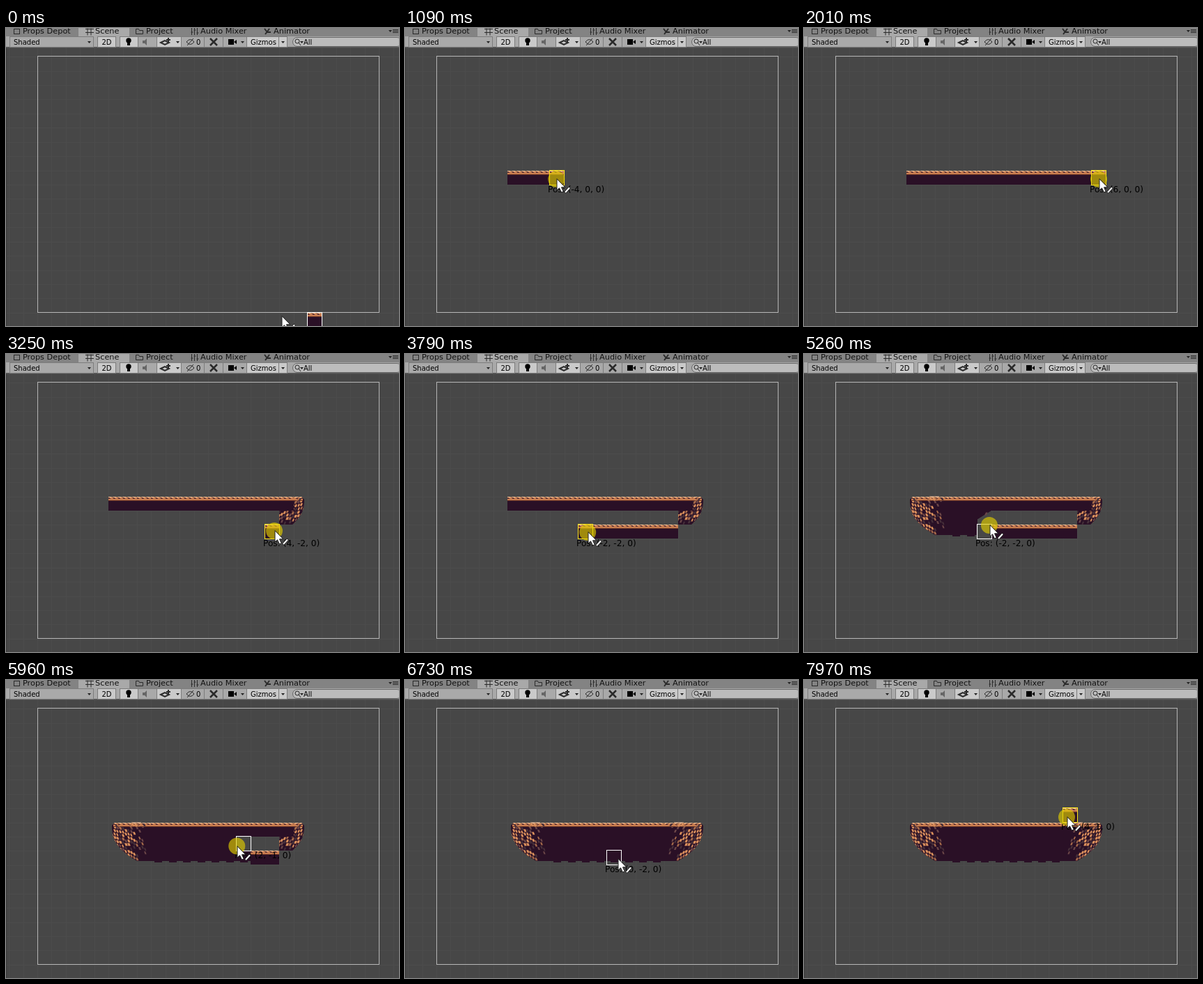
These frames come from a looping animation (564 by 428 pixels, 8 s). An HTML page with a canvas:

```html
<!DOCTYPE html>
<html lang="en">
<head>
<meta charset="utf-8">
<title>Rule tile painting</title>
<style>
html, body { margin: 0; width: 564px; height: 428px; overflow: hidden; background: #474747; }
canvas, svg.bar { position: absolute; left: 0; top: 0; display: block; }
text { font: 11.3px "DejaVu Sans", sans-serif; fill: #111; }
.small text { font-size: 10px; fill: #000; }
.button { fill: #a9a9a9; stroke: #7c7c7c; }
.button.on { fill: #cacaca; }
.icon { fill: none; stroke: #2a2a2a; }
</style>
</head>
<body>
<canvas id="view" width="564" height="428"></canvas>
<svg class="bar" width="564" height="29">
  <defs>
    <path id="caret" d="M0 0h5l-2.500 3z" fill="#222"/>
  </defs>
  <rect width="564" height="12" fill="#838383"/>
  <rect x="104" width="73" height="13" fill="#a9a9a9"/>
  <rect y="12" width="564" height="16" fill="#a9a9a9"/>
  <rect y="27" width="564" height="1.500" fill="#5c5c5c"/>
  <g transform="translate(.5 12.500)">
    <rect class="button" x="5" width="120" height="15"/>
    <rect class="button on" x="131" width="26" height="15"/>
    <rect class="button on" x="163" width="26" height="15"/>
    <rect class="button" x="189" width="27" height="15"/>
    <rect class="button on" x="216" width="35" height="15"/>
    <rect class="button" x="251" width="33" height="15"/>
    <rect class="button" x="284" width="27" height="15"/>
    <rect class="button" x="311" width="34" height="15"/>
    <rect class="button on" x="345" width="46" height="15"/>
    <rect class="button on" x="391" width="12" height="15"/>
    <rect x="411" y="1" width="156" height="13" rx="6.500" fill="#bcbcbc" stroke="#686868"/>
  </g>
  <use href="#caret" x="117" y="19"/>
  <use href="#caret" x="244" y="19"/>
  <use href="#caret" x="337" y="19"/>
  <use href="#caret" x="395" y="19"/>
  <use href="#caret" x="422" y="19"/>
  <use href="#caret" x="549" y="3"/>
  <path class="icon" d="M555 2.500h8m-8 2h8m-8 2h8"/>
  <circle cx="176" cy="18" r="3.700"/><rect x="174" y="21" width="4" height="4"/>
  <path d="M196 18h3l3-3v10l-3-3h-3z" fill="#666"/>
  <path class="icon" d="M222 21l6-3 6 3-6 3zm8-4h6m-3-3v6" stroke-width="2"/>
  <path class="icon" d="M259 20q5.500-7 11 0q-5.500 7-11 0m1 5l9-10"/>
  <path class="icon" d="M293 15l10 10m0-10l-10 10" stroke-width="2.500"/>
  <path d="M319 16h8v8h-8zm8 4l4-3v6z"/>
  <circle class="icon" cx="418" cy="19" r="3"/><path class="icon" d="M420 21l3 4"/>
  <rect class="icon" x="11.500" y="1.500" width="8" height="7"/>
  <path class="icon" d="M114 1.500h12m-12 5h12m-9-6v10m5-10v10"/>
  <path class="icon" d="M186.500 1.500h4l1 2h5v5h-10z"/>
  <path class="icon" d="M266.500 0v10m4-10v10m4-10v10m-9-4h3m1-3h3m1 4h3"/>
  <path class="icon" d="M371 1l4 5h5m-2-5l-6 8" stroke-width="2"/>
  <text x="24" y="8">Props Depot</text>
  <text x="128" y="8">Scene</text>
  <text x="201" y="8">Project</text>
  <text x="279" y="8">Audio Mixer</text>
  <text x="384" y="8">Animator</text>
  <g class="small">
    <text x="11" y="24">Shaded</text>
    <text x="137.500" y="24">2D</text>
    <text x="273" y="24">0</text>
    <text x="351" y="24">Gizmos</text>
    <text x="427" y="24">All</text>
  </g>
</svg>
<script>
const ctx = document.getElementById('view').getContext('2d');
const LOOP = 8000, STEP = 77.2, CELL = 20.42, OX = 290.1, OY = 204.6;
const DARK = '#2a1026', YELLOW = '#ffe81a';

// Key points of the pointer: time, x, y
const path = [[70, 396, 414], [610, 166, 217], [860, 166, 217], [2010, 424, 217],
  [2410, 424, 222], [2710, 418, 238], [3250, 387, 254], [3800, 262, 256],
  [3870, 258, 238], [4330, 182, 235], [4650, 180, 242], [4800, 200, 260],
  [5260, 267, 246], [5490, 256, 238], [6260, 382, 239], [6500, 382, 239],
  [6720, 310, 259], [6960, 200, 200], [7260, 372, 195], [7340, 396, 214],
  [7570, 378, 197]];

const cellX = cx => Math.round(OX + cx * CELL);
const cellY = cy => Math.round(OY - cy * CELL);
const key = (cx, cy) => cx + ',' + cy;
const pressed = t => (t >= 850 && t < 6330) || t >= 7880;
const clamp = (v, a, b) => Math.max(a, Math.min(b, v));

function hash(i, j) {
  const v = Math.sin(i * 127.1 + j * 311.7) * 43758.5;
  return v - Math.floor(v);
}

// The screen refreshes in even steps
const snap = t => Math.max(0, 12 + STEP * Math.floor((t - 2) / STEP));

function pointer(t) {
  let i = 1;
  while (i < path.length - 1 && path[i][0] < t) i++;
  const [t0, x0, y0] = path[i - 1], [t1, x1, y1] = path[i];
  const k = clamp((t - t0) / (t1 - t0), 0, 1);
  return [x0 + (x1 - x0) * k, y0 + (y1 - y0) * k];
}

function cellAt(t) {
  if (t < 70) return [7, -10];
  const [x, y] = pointer(t);
  return [Math.floor((x - OX) / CELL), Math.floor((OY + CELL - y) / CELL)];
}

// Time at which each cell is first painted
const painted = new Map();
for (let t = 860; t < 6330; t += 5) {
  const c = cellAt(t), k = key(...c);
  if (!painted.has(k)) painted.set(k, { c, t });
}

function rect(x, y, w, h, color) {
  ctx.fillStyle = color;
  ctx.fillRect(x, y, w, h);
}

function strip(x, y, w) {
  rect(x, y, w, 6, '#b56b43');
  rect(x, y, w, 1, '#b08a6c');
  rect(x, y + 1, w, 1, '#7c4636');
  rect(x, y + 3, w, 1, '#e0935f');
  rect(x, y + 5, w, 1, '#7a432f');
  for (let i = 0; i < w - 4; i += 7) {
    rect(x + i, y, 4, 1, '#efc39b');
    rect(x + i + 2, y + 1, 4, 1, '#dc9160');
    rect(x + i, y + 2, 3, 1, '#4a2430');
  }
}

// Slanted stones in uneven columns, thinned out by the density at each x
function rocks(x0, y0, x1, y1, density, lean = 1.5) {
  for (let x = x0; x < x1; x += 4) {
    for (let y = y0 - 4 * hash(x, 1); y < y1; y += 5) {
      const d = density(x), h = hash(x, y);
      if (h > d) continue;
      const tone = hash(y, x) * d, w = 2 + h * 1.6;
      ctx.fillStyle = tone > .48 ? '#d98f5c' : tone > .3 ? '#a3684a' : tone > .15 ? '#6b4648' : '#46303a';
      ctx.beginPath();
      ctx.moveTo(x, y);
      ctx.lineTo(x + w, y);
      ctx.lineTo(x + w + lean, y + 4);
      ctx.lineTo(x + lean, y + 4);
      ctx.fill();
    }
  }
}

function flat(x, y, w) {
  rect(x, y, w, 20, DARK);
  strip(x, y, w);
}

// Look of a cell follows from its neighbours
function tile(cx, cy, has) {
  const x = cellX(cx), y = cellY(cy), w = cellX(cx + 1) - x, h = cellY(cy - 1) - y;
  const up = has(cx, cy + 1), down = has(cx, cy - 1);
  if (!up) {
    flat(x, y, w);
    if (down) rect(x, y + 6, w, h - 6, DARK);
    if (down && !has(cx, cy - 2)) rocks(x, y + 7, x + w - 2, y + 15, () => .65, -1);
  } else if (!down) {
    rect(x, y, w, 15, DARK);
    rect(x + 5, y, 11, 17, DARK);
  } else if (!has(cx + 1, cy)) {
    for (let i = 0; i < 12; i++) rect(x, y + i, 19 - i * 1.6, 1, DARK);
    rocks(x + 4, y + 3, x + 13, y + 6, () => .5, -2);
  } else {
    rect(x, y, w, h, DARK);
  }
}

// Curved left bank, a given number of rows deep; mirrored for the right one
function bank(rows, mirror) {
  const full = rows === 3, inner = full ? 208 : 188;
  const bottom = full ? 260 : 205 + rows * 20;
  ctx.save();
  if (mirror) {
    ctx.translate(580, 0);
    ctx.scale(-1, 1);
  }
  ctx.beginPath();
  ctx.moveTo(inner, 205);
  ctx.lineTo(156, 205);
  for (let d = 0; d <= 1; d += .1) {
    ctx.lineTo(152 + (full ? 36 : 17) * d ** 2.5, 209 + (bottom - 209) * d);
  }
  ctx.lineTo(inner, bottom);
  ctx.clip();
  rect(150, 204, 60, 60, DARK);
  rocks(150, 212, inner, bottom - 3, x => full ? clamp((211 - x) / 44, 0, .86) : .8);
  strip(154, 205, 54);
  rocks(156, 208, 200, 209, () => .55, 2);
  ctx.restore();
  if (full) rect(mirror ? 386 : 180, 204, 14, 1, '#a98a76');
}

function terrain(t, [hx, hy], blank, has) {
  const left = has(-5, -2) ? 3 : has(-5, -1) ? 1 : 0;
  const right = has(4, -1) ? 3 : has(5, -1) ? 2 : 0;
  const inBank = (cx, cy) => cx + cy < -6 || cx - cy > 6 ||
    (left && cx - cy === -7 + 2 * -cy && cy > -left) ||
    (left && cx + 7 <= -cy && cy > -left) ||
    (right && cx - 6 >= cy && cx >= 6 + cy && cy > -right && cx >= 5 - (cy < -1));
  const hidden = (cx, cy) => {
    const edge = cx < 0 ? -7 - cy : 6 + cy;
    const rows = cx < 0 ? left : right;
    const outside = cx < 0 ? cx < edge : cx > edge;
    const corner = cx === edge && -cy < rows;
    return outside || corner || (rows === 3 && cy === -2 && (cx < -5 || cx > 4));
  };
  const banks = full => {
    if (left && (left === 3) === full) bank(left, false);
    if (right && (right === 3) === full) bank(right, true);
  };
  banks(false);
  for (const { c: [cx, cy], t: at } of painted.values()) {
    const erased = blank && cx === hx && cy === hy;
    if (at <= t && !erased && !hidden(cx, cy)) tile(cx, cy, has);
  }
  banks(true);
  if (!has(hx, hy) && !has(hx, hy + 1)) flat(cellX(hx), cellY(hy), 20);
}

function backdrop() {
  rect(0, 0, 564, 428, '#474747');
  for (let i = -15; i < 15; i++) {
    rect(cellX(i), 28, 1, 400, '#4c4c4c');
    rect(0, cellY(i), 564, 1, '#4c4c4c');
  }
  rect(0, 28, 1, 400, '#3b3b3b');
  ctx.lineWidth = 1;
  ctx.strokeStyle = '#b5b5b5';
  ctx.strokeRect(45.5, 40.5, 490, 368);
}

const arrowShape = new Path2D('M0 0v16l3.500-3.200 3 6.200 2.700-1.200-2.700-6h5z');
const brushShape = new Path2D('M12.500 18.500l5-5.500');

function arrow(x, y) {
  ctx.save();
  ctx.translate(Math.round(x), Math.round(y));
  ctx.lineCap = 'round';
  for (const [color, width] of [['#222', 3.6], ['#fff', 2]]) {
    ctx.strokeStyle = color;
    ctx.lineWidth = width;
    ctx.stroke(brushShape);
  }
  ctx.lineWidth = 1;
  ctx.strokeStyle = '#222';
  ctx.fillStyle = '#fff';
  ctx.fill(arrowShape);
  ctx.stroke(arrowShape);
  ctx.restore();
}

function draw(time) {
  const t = snap(time), [x, y] = pointer(t), [hx, hy] = cellAt(t);
  const bx = cellX(hx), by = cellY(hy);
  const has = (cx, cy) => {
    const cell = painted.get(key(cx, cy));
    return !!cell && cell.t <= t;
  };
  const covered = has(hx, hy + 1);
  backdrop();
  terrain(t, [hx, hy], pressed(t) && covered, has);
  ctx.font = '12.2px "DejaVu Sans", sans-serif';
  ctx.fillStyle = '#000';
  ctx.fillText(`Pos: (${hx}, ${hy}, 0)`, bx - 3, by + 31);
  ctx.strokeStyle = pressed(t) && !covered ? YELLOW : '#fff';
  ctx.strokeRect(bx - .5, by - .5, 21, 21);
  if (pressed(t)) {
    ctx.fillStyle = 'rgba(225,205,0,.65)';
    ctx.beginPath();
    ctx.arc(x - 1, y, 12, 0, 7);
    ctx.fill();
  }
  arrow(x, y);
}

const start = performance.now();
function loop() {
  draw((performance.now() - start) % LOOP);
  requestAnimationFrame(loop);
}
loop();
</script>
</body>
</html>
```
